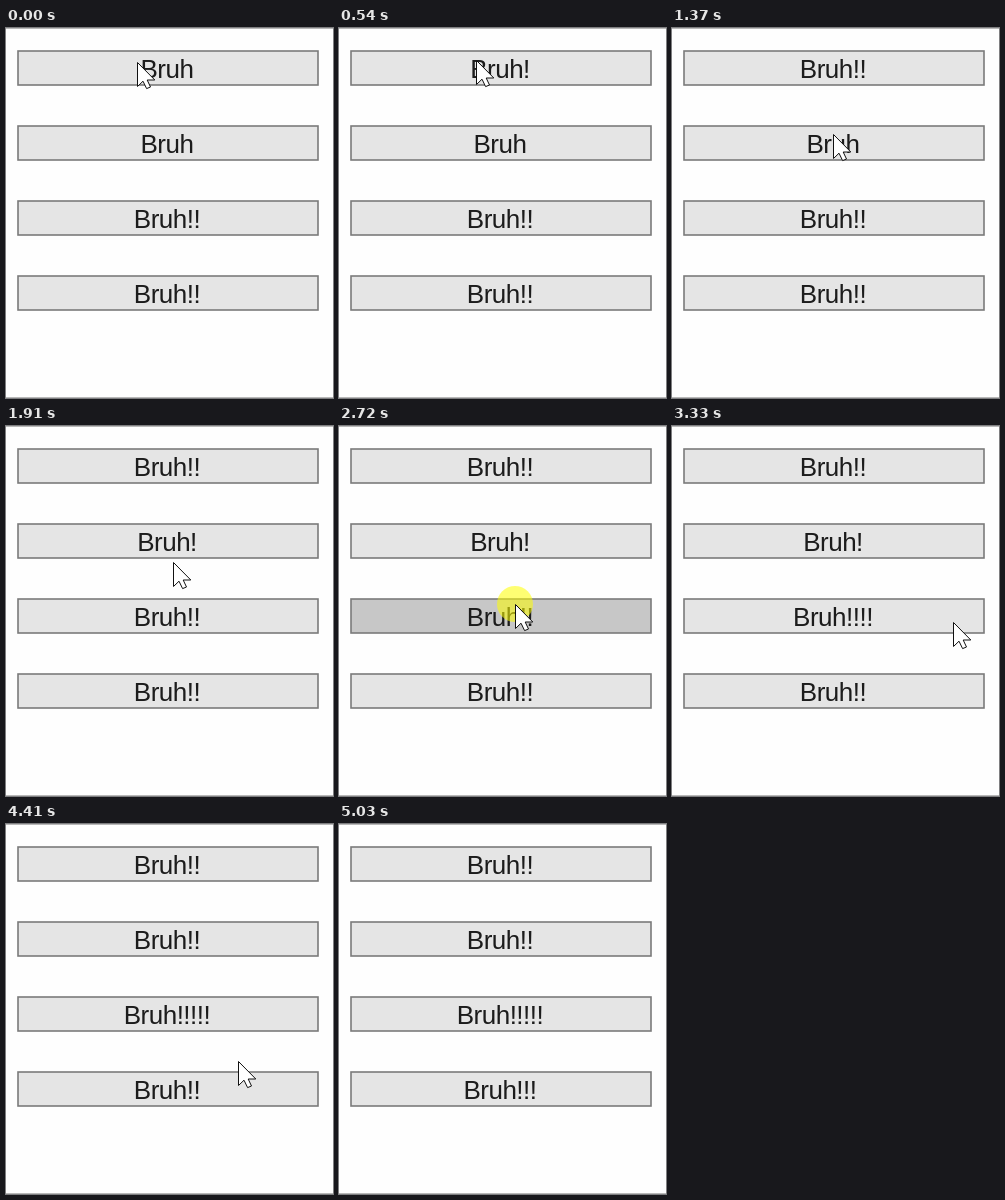
Animation, 327 px wide and 370 px high, one loop 5.83 s. Source, as an HTML page:

```html
<!DOCTYPE html>
<html lang="en">
<head>
<meta charset="utf-8">
<title>Buttons</title>
<style>
  html, body { margin: 0; width: 100%; height: 100%; overflow: hidden; background: #fefefe; }
  svg { display: block; }
  .button rect { fill: #e5e5e5; stroke: #7a7a7a; stroke-width: 1.6; }
  .button.down rect { fill: #c7c7c7; }
  text { font: 26px "Liberation Sans", Arial, sans-serif; letter-spacing: -.5px; text-anchor: middle; fill: #1c1c1c; }
</style>
</head>
<body>
<svg width="327" height="370" viewBox="0 0 327 370">
  <path d="M0 .5H327M0 369.5H327" stroke="#b8b8b8"/>
  <g id="buttons"></g>
  <g id="mouse">
    <circle id="spot" r="18" fill="#ff0" fill-opacity=".55"/>
    <path d="M.5 .5V24.5L6 19.2L9.6 26.6L13.5 25L10.2 18H17.8Z" fill="#fff" stroke="#111"/>
  </g>
</svg>
<script>
const LOOP = 5830, TICK = 70;
const START_MARKS = [0, 0, 2, 2];

const stop = (arrive, down, up, button, x, y) => ({ arrive, down, up, button, x, y });
const stops = [
  stop(0, 70, 270, 0, 131, 34),
  stop(490, 740, 950, 0, 137, 32),
  stop(1370, 1630, 1840, 1, 161, 106),
  stop(2260, 2720, 2920, 2, 176, 178),
  stop(3130, 3130, 3330, 2, 281, 196),
  stop(3530, 3530, 3660, 2, 281, 196),
  stop(3790, 4060, 4200, 1, 258, 113),
  stop(4620, 4820, 4890, 3, 228, 255)
];
const exit = { arrive: 4960, gone: 5030, x: 212, y: 310 };

const byId = id => document.getElementById(id);
const show = (id, on) => byId(id).style.display = on ? "" : "none";

byId("buttons").innerHTML = START_MARKS.map((_, i) =>
  `<g class="button" transform="translate(0 ${75 * i})">
    <rect x="12" y="23" width="300" height="34"/><text x="161" y="50"></text>
  </g>`).join("");
const buttons = [...document.querySelectorAll(".button")];

// The pointer is redrawn once per tick, counted from the latest press.
function pointer(t) {
  const pressed = stops.findLast(s => s.down <= t)?.down ?? 0;
  const time = pressed + Math.floor((t - pressed) / TICK) * TICK;
  const i = stops.findLastIndex(s => s.up <= time);
  const to = stops[i + 1] || exit, from = stops[i] || to;
  const left = Math.max(0, to.arrive - time) / (to.arrive - from.up);
  const eased = 1 - left ** 3;
  const mix = axis => Math.round(from[axis] + (to[axis] - from[axis]) * eased);
  return `translate(${mix("x")} ${mix("y")})`;
}

function draw(t) {
  const held = stops.find(s => t >= s.down && t < s.up);
  buttons.forEach((button, i) => {
    const clicks = stops.filter(s => s.button === i && t >= s.up).length;
    button.lastElementChild.textContent = "Bruh" + "!".repeat(START_MARKS[i] + clicks);
    button.classList.toggle("down", held?.button === i);
  });
  byId("mouse").setAttribute("transform", pointer(t));
  show("mouse", t < exit.gone);
  show("spot", held);
}

const start = performance.now();
function frame() {
  draw((performance.now() - start) % LOOP);
  requestAnimationFrame(frame);
}
frame();
</script>
</body>
</html>
```
